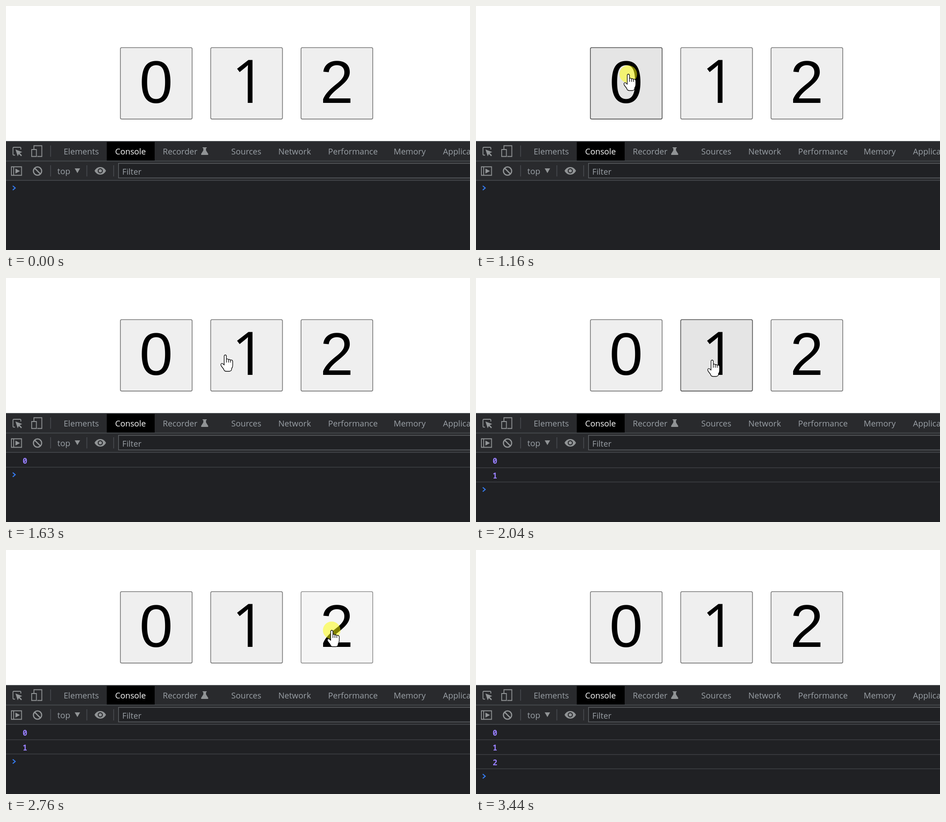
Write an HTML page that moves like this. It is 1030x544 px and loops after 3.8 s.

```html
<!DOCTYPE html>
<html lang="en">
<head>
<meta charset="utf-8">
<title>Button clicks logged to the console</title>
<style>
  html, body { margin: 0; width: 100%; height: 100%; overflow: hidden; background: #fff; }
  svg { display: block; width: 1030px; height: 544px; }
  .button rect { fill: #efefef; stroke: #767676; stroke-width: 1.6; }
  .button.hover rect { fill: #e5e5e5; stroke: #4f4f4f; }
  .button.active rect { fill: #f5f5f5; stroke: #8d8d8d; }
  .button text { font: 133px "Liberation Sans", Arial, sans-serif; text-anchor: middle; }
  /* Open Sans draws the 1 without a foot */
  .button:nth-child(2) text { font-family: "Open Sans", sans-serif; transform: translateX(5px); }
  .ui { font: 18.2px "Open Sans", "Noto Sans", sans-serif; fill: #9aa0a6; }
  .log text { font: 600 17px "Noto Sans Mono", monospace; fill: #9980ff; }
  .rule { stroke: #494c50; stroke-width: 1.6; }
  .log .rule { stroke: #3f4144; }
  .icon { fill: none; stroke: #919496; stroke-width: 1.8; }
  .solid { fill: #919496; }
  .cursor path { fill: #fff; stroke: #000; stroke-width: 1.3; stroke-linejoin: round; }
</style>
</head>
<body>
<svg viewBox="0 0 1030 544">
  <g id="buttons"></g>

  <rect y="301" width="1030" height="243" fill="#202124"/>
  <rect y="301" width="1030" height="88" fill="#292a2d"/>
  <path class="rule" d="M0 301.8H1030M0 345.6H1030M0 388.8H1030M99 311V336M99 355V380M179.500 355V380M239 355V380"/>
  <rect x="223.700" y="303" width="106.300" height="41.500" fill="#000"/>
  <rect x="249.800" y="350.800" width="800" height="32.500" fill="#202124" stroke="#5b5e62" stroke-width="1.6"/>
  <g class="ui">
    <text x="128" y="331">Elements</text>
    <text x="242.300" y="331" fill="#fff">Console</text>
    <text x="348" y="331">Recorder</text>
    <text x="500" y="331">Sources</text>
    <text x="604.500" y="331">Network</text>
    <text x="715" y="331">Performance</text>
    <text x="860.500" y="331">Memory</text>
    <text x="970" y="331">Applica</text>
    <text x="114" y="375">top</text>
    <text x="258" y="376">Filter</text>
  </g>

  <g class="icon">
    <path d="M20 332.500H17.500Q15.500 332.500 15.500 330.500V317Q15.500 315 17.500 315H31Q33 315 33 317V320"/>
    <path d="M62 319V311.500H79.500V335.500H69.500M57 320H67.500V335.500H57Z"/>
    <path d="M12 358.500H34.500V377.500H12ZM17 358.500V377.500"/>
    <circle cx="70" cy="368" r="9.200" stroke-width="2.600"/>
    <path d="M63.500 361.500L76.500 374.500" stroke-width="2.600"/>
  </g>
  <g class="solid">
    <path d="M21 320L36 325.500L30.500 328L35.500 333L33.500 335L28.500 330L26 335Z"/>
    <path d="M436.500 315H445.500V317H444V322L449 330Q449.500 332 447.500 332H434.500Q432.500 332 433 330L438 322V317H436.500Z"/>
    <path d="M21 362.500L31 368L21 373.500Z"/>
    <path d="M152.500 362H164.500L158.500 372.500Z"/>
    <path d="M196.500 367.500Q201 359 209.300 359T222 367.500Q217.500 376 209.300 376T196.500 367.500Z"/>
    <circle cx="209.300" cy="367.500" r="4.700" fill="none" stroke="#292a2d" stroke-width="2.200"/>
  </g>

  <g class="log" id="rows"></g>
  <path id="prompt" d="M15 401L20.500 405.700L15 410.400" fill="none" stroke="#367cf1" stroke-width="2.200"/>

  <g class="cursor" id="cursor">
    <circle id="glow" r="19.500" fill="#ff0" fill-opacity=".5"/>
    <path id="hand" d="M-2.300 2.500a2.500 2.500 0 0 1 5 0V9.500q2.500-1.500 4.500.8q2.500-1 4.200 1q4.600-1 5.300 3.200V23q0 4-2.500 7.500V32q-.5 4-5 4.500H1.500q-4-.5-5-5L-8.500 25Q-11 20.500-8 19Q-6 18-2.300 22.500ZM-2.300 22.500V16M2.700 9.500V17M7.200 10.300V17M11.400 11.500V17"/>
    <path id="arrow" d="M0 0V27l6.200-6 4 9.400 4.500-2-4-9h8.600Z"/>
  </g>
</svg>
<script>
const $ = id => document.getElementById(id);
const LOOP = 3800, STEP = 36.6, HOLD = 75;   // ms; the pointer moves once per STEP
const SIZE = 159.3, TOP = 92.8;

// Highlight and press time of each button
const clicks = [{ glow: 1160, press: 1200 }, { glow: 1960, press: 1960 }, { glow: 2760, press: 2760 }];

// Pointer legs; pull is how strongly the sideways motion slows down
const stops = [[552, 462], [338, 152], [524, 183], [723, 179], [820, 620]];
const legs = [
  { start: 480, end: 830, pull: 1.35 },
  { start: 1520, end: 1710, pull: 1.86 },
  { start: 2320, end: 2590, pull: 3.4 },
  { start: 3250, end: 3440, pull: 1 }];

const left = i => 253.9 + 200.5 * i;
const easeOut = (f, power) => 1 - (1 - f) ** power;
const show = (el, on) => el.style.display = on ? "" : "none";

$("buttons").innerHTML = clicks.map((_, i) =>
  `<g class="button"><rect x="${left(i)}" y="${TOP}" width="${SIZE}" height="${SIZE}" rx="3.2"/>
   <text x="${left(i) + SIZE / 2 - .3}" y="216">${i}</text></g>`).join("");
$("rows").innerHTML = clicks.map((_, i) =>
  `<g><text x="37" y="${414 + 33 * i}">${i}</text><path class="rule"/></g>`).join("");

function pointer(t) {
  const i = Math.max(0, legs.findLastIndex(leg => t >= leg.start));
  const { start, end, pull } = legs[i];
  const snapped = Math.max(0, Math.floor((t - start) / STEP) * STEP);
  const f = t >= end ? 1 : snapped / (end - start);
  const mix = (axis, power) => stops[i][axis] + (stops[i + 1][axis] - stops[i][axis]) * easeOut(f, power);
  return [mix(0, pull), mix(1, 1.15)];
}

const buttonAt = ([x, y]) => y < TOP || y > TOP + SIZE + 1 ? -1
  : clicks.findIndex((_, i) => x >= left(i) - 1 && x <= left(i) + SIZE);

function draw(t) {
  const spot = pointer(t), over = buttonAt(spot), before = buttonAt(pointer(t - STEP));
  const count = clicks.filter(c => t >= c.press + HOLD).length;
  clicks.forEach((c, i) => {
    const pressed = t >= c.press && t < c.press + HOLD;
    const state = pressed ? "active" : over === i && before === i ? "hover" : "";
    $("buttons").children[i].setAttribute("class", "button " + state);
    const row = $("rows").children[i];
    show(row, i < count);
    row.lastChild.setAttribute("d", `M0 ${(i === count - 1 ? 421.7 : 423) + 33 * i}H1030`);
  });
  $("prompt").setAttribute("transform", `translate(0 ${32.9 * count})`);

  show($("cursor"), t >= legs[0].start && t < legs.at(-1).end);
  show($("glow"), clicks.some(c => t >= c.glow && t < c.press + HOLD));
  show($("hand"), over >= 0);
  show($("arrow"), over < 0);
  $("cursor").setAttribute("transform", `translate(${spot})`);
}

const start = performance.now();
function frame() {
  draw((performance.now() - start) % LOOP);
  requestAnimationFrame(frame);
}
frame();
</script>
</body>
</html>
```
